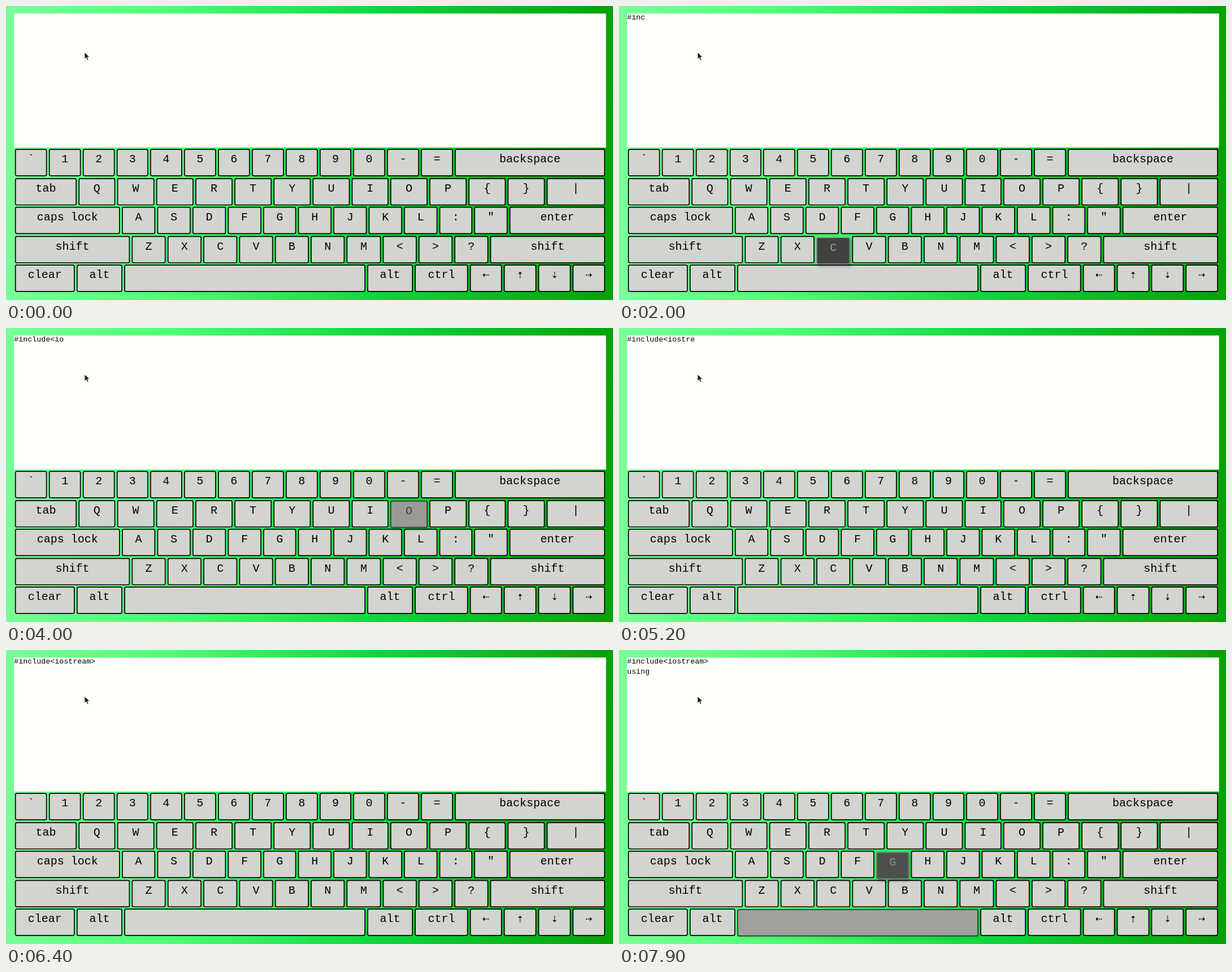
Write an HTML page that moves like this. It is 1074 by 521 pixels and loops after 8000 ms.

```html
<!DOCTYPE html>
<html lang="en">
<head>
<meta charset="utf-8">
<title>Virtual keyboard</title>
<style>
  html, body { margin: 0; width: 100%; height: 100%; overflow: hidden; }
  #stage {
    position: relative; width: 1074px; height: 521px; overflow: hidden;
    background: linear-gradient(to right, #79ff99, #4dff73 27%, #0dd63d 62%, #08a008);
  }
  /* The page is laid out at 1.2 times the stage size. */
  #board {
    position: absolute; left: 0; top: 0; width: 1289px; height: 625px;
    transform: scale(.83333); transform-origin: 0 0;
    font-family: "Liberation Mono", "DejaVu Sans Mono", monospace;
    color: #000;
  }
  #panel { position: absolute; left: 17px; top: 16px; width: 1257px; height: 285px; background: #fffffb; }
  #text { position: absolute; left: 17px; top: 14px; margin: 0; font: inherit; font-size: 16px; line-height: 22px; }
  #pointer { position: absolute; left: 136px; top: 79px; }
  .key {
    position: absolute; box-sizing: border-box; height: 58px;
    border: 2px solid #000; border-radius: 4px; background: #d3d3cf;
    font-size: 24px; line-height: 42px; text-align: center; white-space: pre;
  }
</style>
</head>
<body>
<div id="stage">
  <div id="board">
    <div id="panel"></div>
    <pre id="text"></pre>
  </div>
  <svg id="pointer" width="16" height="22">
    <path d="M3 3v12.2l2.9-2.6 2 4.6 2.2-1-2-4.4h3.9z" fill="#1c1c1c" stroke="#fff" stroke-width=".8" stroke-linejoin="round"/>
  </svg>
</div>
<script>
const LOOP = 8000, FADE = 100, HOLD = 160, LEFT = 19.2, RIGHT = 1272.4, GAP = 4;
const board = document.getElementById('board');
const text = document.getElementById('text');
const keys = new Map(), pairs = [];

function addKey(label, alt, x, y, w) {
  const el = document.createElement('div');
  const left = Math.round(x), width = Math.round(x + w) - left;
  el.className = 'key';
  el.textContent = label;
  el.style.cssText = `left:${left}px;top:${y}px;width:${width}px`;
  board.append(el);
  if (!keys.has(label)) keys.set(label, el);
  if (alt !== label) pairs.push([el, label, alt]);
}

// Each key is [label, shifted label, width]; the last one fills the row.
function addRow(row, list) {
  const y = Math.round(304 + 61.5 * row);
  let x = LEFT;
  list.forEach(([label, alt, w = RIGHT - x]) => {
    addKey(label, alt, x, y, w);
    x += w + GAP;
  });
}
const chars = (base, alt, w) => [...base].map((c, i) => [c, alt[i], w]);
const named = (name, w) => [name, name, w];
const letters = (s, w) => chars(s, s.toLowerCase(), w);

addRow(0, [...chars('`1234567890-=', '~!@#$%^&*()_+', 67.82), named('backspace')]);
addRow(1, [named('tab', 130.3), ...letters('QWERTYUIOP', 78.86), ...chars('{}', '[]', 78.86), ['|', '\\']]);
addRow(2, [named('caps lock', 223.1), ...letters('ASDFGHJKL', 70.82), ...chars(':"', ";'", 70.82), named('enter')]);
addRow(3, [named('shift', 243.8), ...letters('ZXCVBNM', 72.08), ...chars('<>?', ',./', 72.08), named('shift')]);
addRow(4, [named('clear', 126.4), named('alt', 97.4), named(' ', 512.2), named('alt', 97), named('ctrl', 112.6),
  ...chars('⇠⇡⇣', '⇠⇡⇣', 68.6), named('⇢')]);

// [key, press time, typed text, hold]
const presses = [
  ['shift', 470, '', 580], ['3', 690, '#'],
  ['I', 1520, 'i'], ['N', 1680, 'n'], ['C', 1828, 'c'], ['L', 2010, 'l'],
  ['U', 2170, 'u'], ['D', 2340, 'd'], ['E', 2520, 'e'],
  ['shift', 2850, '', 540], ['<', 3098, '<'],
  ['I', 3650, 'i'], ['O', 3775, 'o'], ['S', 4110, 's'],
  ['T', 4560, 't'], ['R', 4740, 'r'], ['E', 4920, 'e'], ['A', 5290, 'a', 215], ['M', 5540, 'm'],
  ['shift', 5960, '', 343], ['>', 6110, '>'], ['enter', 6520, '\n', 380],
  ['U', 7240, 'u'], ['S', 7360, 's'], ['I', 7480, 'i'], ['N', 7600, 'n'], ['G', 7719, 'g'], [' ', 7871, ' ']
];

const clamp = v => Math.max(0, Math.min(1, v));
const mix = (a, b, k) => `rgb(${a.map((v, i) => Math.round(v + (b[i] - v) * k))})`;
const FACE = [211, 211, 207], BLACK = [0, 0, 0], WHITE = [255, 255, 251];
const DARK = [42, 42, 40], INK = [180, 180, 176], EDGE = [160, 160, 156];

function paint(name, k) {
  const s = keys.get(name).style, shift = name === 'shift';
  s.background = mix(FACE, shift ? WHITE : DARK, k);
  s.color = mix(BLACK, shift ? BLACK : INK, k);
  s.borderColor = mix(BLACK, shift ? BLACK : EDGE, k);
  s.transform = k ? `translateY(${3 * k}px)` : 'none';
  s.boxShadow = k ? `2px 4px 5px rgba(0,0,0,${0.35 * k})` : 'none';
  s.zIndex = k ? 1 : 0;
}

function draw() {
  const t = performance.now() % LOOP;
  const level = {};
  let typed = '', shifted = false;
  for (const [name, at, out, hold = HOLD] of presses) {
    const dt = t - at;
    const k = Math.min(clamp(dt / FADE), clamp((hold + FADE - dt) / FADE));
    level[name] = Math.max(level[name] || 0, k);
    if (dt >= 0) typed += out;
    if (name === 'shift' && dt >= 0 && dt < hold) shifted = true;
  }
  for (const name in level) paint(name, level[name]);
  for (const [el, base, alt] of pairs) {
    const label = shifted ? alt : base;
    if (el.textContent !== label) el.textContent = label;
  }
  if (text.textContent !== typed) text.textContent = typed;
  requestAnimationFrame(draw);
}
draw();
</script>
</body>
</html>
```
